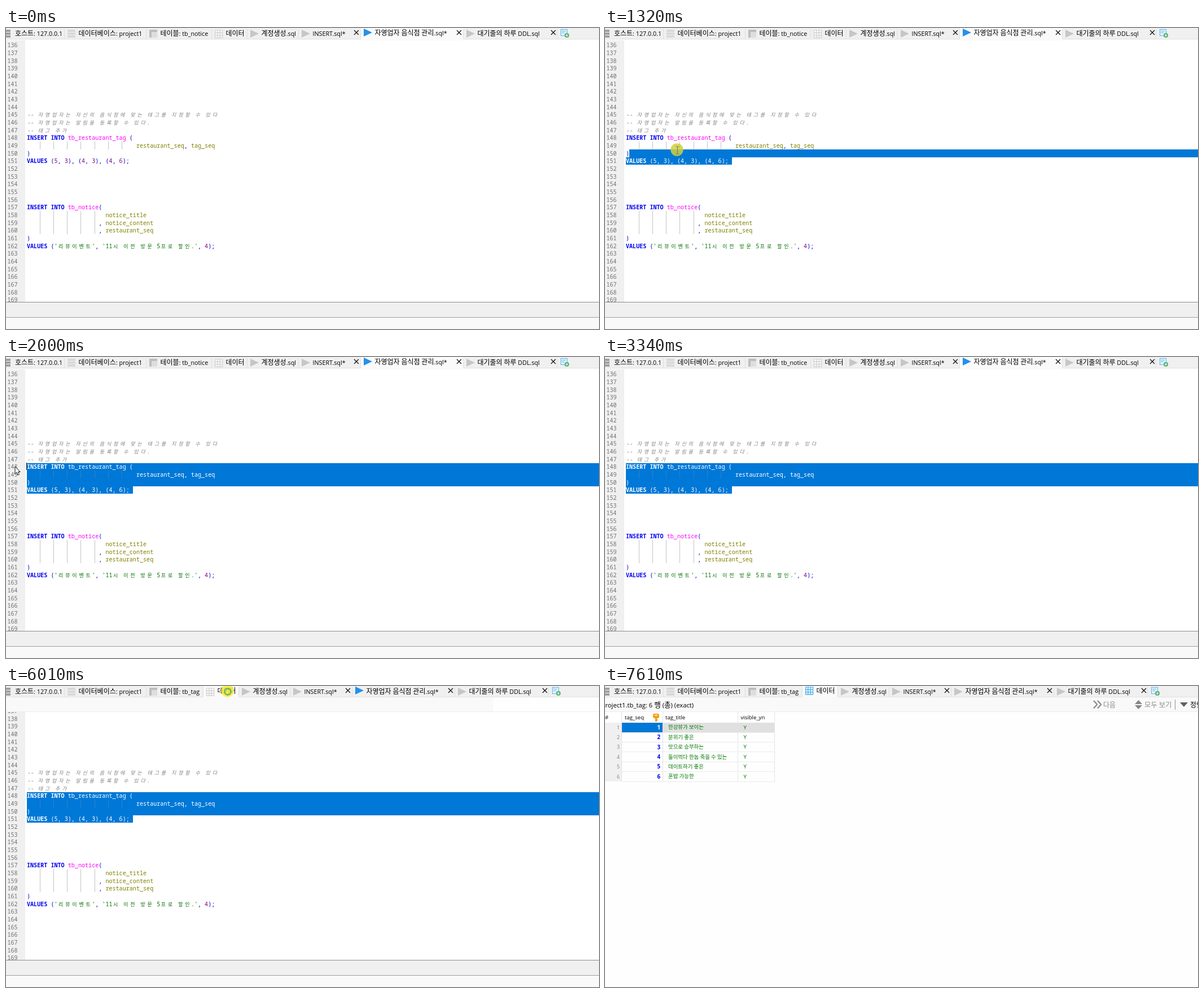
Recreate the animation shown at these times as an HTML page with a canvas. Size 1051 by 533 pixels, loop 8 s.

```html
<!DOCTYPE html>
<html lang="ko">
<head>
<meta charset="utf-8">
<style>
html, body { margin: 0; width: 100%; height: 100%; overflow: hidden; background: #fff; }
canvas { display: block; }
</style>
</head>
<body>
<canvas id="stage" width="1051" height="533"></canvas>
<script>
const ctx = document.getElementById('stage').getContext('2d');
const LOOP = 8000, W = 1051, H = 533;
const CELL = 6.06, ROW = 13.667, LEFT = 37, FIRST_ROW = 136;
const BLUE = '#0078d7';
const UI = '"Open Sans", "Noto Sans", sans-serif';
const HANGUL = '"Noto Sans CJK KR", "Noto Sans CJK", sans-serif';
const MONO = '"Noto Sans Mono", monospace';

const code = {
  145: '-- 자영업자는 자신의 음식점에 맞는 태그를 지정할 수 있다',
  146: '-- 자영업자는 알림을 등록할 수 있다.',
  147: '-- 태그 추가',
  148: 'INSERT INTO tb_restaurant_tag (',
  149: ' '.repeat(32) + 'restaurant_seq, tag_seq',
  150: ')',
  151: 'VALUES (5, 3), (4, 3), (4, 6);',
  157: 'INSERT INTO tb_notice(',
  158: ' '.repeat(23) + 'notice_title',
  159: ' '.repeat(21) + ', notice_content',
  160: ' '.repeat(21) + ', restaurant_seq',
  161: ')',
  162: "VALUES ('리뷰이벤트', '11시 이전 방문 5프로 할인.', 4);"
};
const TOKENS = /(--.*)|('[^']*')|(INSERT INTO|VALUES)|(tb_\w+)|([a-z]\w*)|(\d+)|(.)/g;
const COLORS = ['#808080', '#007000', '#0000f0', '#ff00ff', '#808000', '#800080', '#0000d0'];

// Left edge, icon, label, close button; tabs from index 3 slide with the table name
const tabs = [
  [-5, 'bars', '호스트: 127.0.0.1'],
  [104, 'bars', '데이터베이스: project1'],
  [249, 'table', '테이블: '],
  [365, 'grid', '데이터'],
  [428, 'play', '계정생성.sql'],
  [519, 'play', 'INSERT.sql*', 621],
  [629, 'play', '자영업자 음식점 관리.sql*', 803],
  [811, 'play', '대기줄의 하루 DDL.sql', 970]
];
const tags = ['한강뷰가 보이는', '분위기 좋은', '맛으로 승부하는', '둘이먹다 한놈 죽을 수 있는', '데이트하기 좋은', '혼밥 가능한'];

// Pointer tracks: time, x, y. The pointer is hidden between tracks.
const tracks = [
  [[190, 391, 369], [560, 83, 270], [980, 223, 234], [1250, 223, 234], [1320, 128, 216],
   [1740, 16, 194], [2000, 16, 194], [2190, 150, 202]],
  [[3600, 193, 203], [3870, 44, 154]],
  [[5500, 60, 140], [5870, 393, 9], [7150, 393, 9], [7350, 919, 17], [7550, 919, 17],
   [7551, 803, 254], [7610, 803, 254]]
];

const within = (t, a, b) => t >= a && t < b;
const isHangul = c => c >= '가' && c <= '힣';
const rowTop = n => 23.8 + (n - FIRST_ROW) * ROW;

function rect(x, y, w, h, color) {
  ctx.fillStyle = color;
  ctx.fillRect(x, y, w, h);
}

function poly(color, ...p) {
  ctx.fillStyle = color;
  ctx.beginPath();
  for (let i = 0; i < p.length; i += 2) ctx.lineTo(p[i], p[i + 1]);
  ctx.closePath();
  ctx.fill();
}

function stroke(color, width, ...p) {
  ctx.strokeStyle = color;
  ctx.lineWidth = width;
  ctx.beginPath();
  for (let i = 0; i < p.length; i += 4) {
    ctx.moveTo(p[i], p[i + 1]);
    ctx.lineTo(p[i + 2], p[i + 3]);
  }
  ctx.stroke();
}

// Interface text: Latin runs are set slightly smaller than Hangul
function label(s, x, y, color = '#000', size = 12, style = '') {
  ctx.fillStyle = color;
  for (const run of s.match(/[가-힣]+|[^가-힣]+/g)) {
    ctx.font = isHangul(run[0]) ? `${style} ${size}px ${HANGUL}` : `${style} ${size * .895}px ${UI}`;
    ctx.fillText(run, x, y);
    x += ctx.measureText(run).width;
  }
}

function rightLabel(s, x, ...rest) {
  ctx.textAlign = 'right';
  label(s, x, ...rest);
  ctx.textAlign = 'left';
}

// Editor text on a fixed grid; Hangul takes two cells
function codeLine(s, y, selectedFrom) {
  let col = 0;
  for (const m of s.matchAll(TOKENS)) {
    const kind = m.slice(1).findIndex(Boolean);
    const style = kind === 0 ? 'italic ' : kind === 2 ? 'bold ' : '';
    for (const c of m[0]) {
      const wide = isHangul(c);
      ctx.font = style + (wide ? '9px ' + HANGUL : '10.1px ' + MONO);
      ctx.fillStyle = col >= selectedFrom ? '#fff' : COLORS[kind];
      ctx.fillText(c, LEFT + col * CELL + (wide ? 1.5 : 0), y);
      col += wide ? 2 : 1;
    }
  }
}

function pointer(t) {
  for (const keys of tracks) {
    for (let i = 1; i < keys.length; i++) {
      const [t0, x0, y0] = keys[i - 1], [t1, x1, y1] = keys[i];
      if (!within(t, t0, t1)) continue;
      const u = (t - t0) / (t1 - t0), k = u * u * (3 - 2 * u);
      return { x: x0 + (x1 - x0) * k, y: y0 + (y1 - y0) * k };
    }
  }
  return null;
}

// First selected row and column, following the drag
function selectionStart(t) {
  if (t < 1250) return null;
  const p = t < 1740 ? pointer(t) : { x: 16, y: 194 };
  const row = Math.min(151, FIRST_ROW + Math.floor((p.y - rowTop(FIRST_ROW)) / ROW));
  const col = Math.round((p.x - LEFT) / CELL);
  return { row, col: Math.max(0, Math.min(code[row].length, col)) };
}

function editor(t) {
  rect(0, 22, W, 463, '#fff');
  rect(0, 22, 34, 463, '#f0f0f0');
  const sel = selectionStart(t);
  ctx.save();
  ctx.beginPath();
  ctx.rect(0, 22, W, 463);
  ctx.clip();
  for (let n = FIRST_ROW; n < 170; n++) {
    const top = Math.round(rowTop(n)), height = Math.round(rowTop(n + 1)) - top;
    const base = rowTop(n) + 10.4;
    let from = Infinity;
    if (sel && n >= sel.row && n <= 151) {
      from = n === sel.row ? sel.col : 0;
      const x = LEFT + from * CELL;
      const end = n === 151 ? 225 : W;
      if (n < 151 || from < 30) rect(x, top, end - x, height, BLUE);
    }
    ctx.font = '10.1px ' + MONO;
    ctx.fillStyle = '#707070';
    ctx.fillText(n, 2.5, base);
    if (!code[n]) continue;
    const indent = code[n].search(/\S/);
    for (let c = 4; c < indent; c += 4)
      rect(Math.floor(LEFT + c * CELL) - 1, top, 1, height, c >= from ? '#2d83c6' : '#c4c4c4');
    codeLine(code[n], base, from);
  }
  const caretOn = within(t, 1740, 2340) || within(t, 2860, 3340) || within(t, 3870, 4400) || within(t, 4930, 5460);
  if (caretOn) rect(36, 187, 1, 13, '#202020');
  ctx.restore();
  rect(0, 485, W, 1, '#8c8c8c');
  rect(0, 486, W, 26, '#f0f0f0');
  rect(0, 512, W, 1, '#a0a0a0');
  rect(0, 513, W, 20, '#f9f9f9');
}

function icon(kind, x, lit) {
  const gray = '#c6c6c6';
  if (kind === 'play') {
    poly(lit ? '#2490ea' : gray, x, lit ? 1 : 3, x + 15, lit ? 8 : 10, x, lit ? 15 : 17);
  } else if (kind === 'bars') {
    for (let i = 0; i < 3; i++) rect(x, 3 + i * 5, 14, 4, x < 0 ? '#a0a0a0' : '#d9d9d9');
  } else if (kind === 'table') {
    rect(x, 3, 14, 14, '#dedede');
    rect(x, 3, 14, 4, '#bdbdbd');
    rect(x, 3, 4, 14, '#bdbdbd');
  } else {
    const top = lit ? 1.5 : 3.5, c = lit ? '#4aaeea' : '#cfcfcf';
    rect(x, top, 14, 14, lit ? '#e4f4fd' : '#fafafa');
    for (let i = 0; i < 4; i++) {
      const d = .5 + i * 4.4;
      stroke(c, 1.2, x + d, top, x + d, top + 14, x, top + d, x + 14, top + d);
    }
  }
}

function tabBar(t) {
  const moved = t >= 5130, active = t < 5940 ? 6 : 3;
  const shift = moved ? -15 : 0;
  rect(0, 0, W, 20, '#f0f0f0');
  rect(0, 19, W, 1, '#e2e2e2');
  tabs.forEach(([left, kind, text, close], i) => {
    const dx = i > 2 ? shift : 0, x = left + dx;
    const next = i < 7 ? tabs[i + 1][0] + (i > 1 ? shift : 0) : 977 + shift;
    const on = i === active;
    if (on) rect(x, 0, next - x, 20, '#fafafa');
    rect(next - 1, 2, 1, 17, '#e0e0e0');
    const lit = i === 6 ? t < 6080 : i === 3 && t >= 6080;
    icon(kind, x + (i ? 5 : -1), lit);
    if (i === 2) text += moved ? 'tb_tag' : 'tb_notice';
    label(text, i ? x + 24.5 : 16, on ? 12.5 : 14);
    if (close) {
      const cx = close + dx;
      stroke('#111', 1.3, cx - 4, 4, cx + 4, 12, cx + 4, 4, cx - 4, 12);
    }
  });
  const x = 983 + shift;
  rect(x, 2, 12, 12, '#58b4e8');
  rect(x + 1, 3, 10, 10, '#e6f5fd');
  stroke('#58b4e8', 1, x + 2, 5.5, x + 9, 5.5, x + 2, 8.5, x + 7, 8.5);
  ctx.fillStyle = '#4caf70';
  ctx.beginPath();
  ctx.arc(x + 11, 13, 4, 0, 7);
  ctx.fill();
  stroke('#fff', 1.2, x + 8.5, 13, x + 13.5, 13, x + 11, 10.5, x + 11, 15.5);
}

function dataView() {
  rect(0, 20, W, 513, '#fefefe');
  rect(0, 20, W, 26, '#f9f9f9');
  rect(0, 45, W, 1, '#ececec');
  label('project1.tb_tag: 6 행 (총) (exact)', -6.5, 37.5, '#000', 12.6);

  for (const x of [866, 873]) stroke('#858585', 2, x, 26, x + 6.5, 33, x + 6.5, 32.5, x, 39.5);
  label('다음', 883, 37.5, '#8c8c8c');
  poly('#858585', 939, 32, 945.5, 25, 952, 32);
  poly('#858585', 939, 34, 945.5, 41, 952, 34);
  label('모두 보기', 956, 37.5, '#8c8c8c', 12.4);
  rect(1010, 24, 1, 18, '#909090');
  poly('#606060', 1019, 29, 1033, 29, 1026, 37);
  label('정렬', 1037, 37.5);

  rect(0, 46, 300, 19, '#fff');
  label('#', 0, 59, '#222', 10.7);
  label('tag_seq', 35, 59, '#000', 10.7);
  label('tag_title', 107, 59, '#000', 10.7);
  label('visible_yn', 240.5, 59, '#000', 10.7);
  ctx.fillStyle = '#f0a010';
  ctx.beginPath();
  ctx.roundRect(85, 49, 11, 8, 3);
  ctx.fill();
  rect(89, 56, 3, 7, '#f0a010');
  rect(91, 59, 2.5, 2, '#f0a010');
  rect(88, 51, 5, 1.5, '#fff');

  rect(0, 65, 30, 104, '#f0f0f0');
  rect(102, 65, 198, 17, '#e0e0e0');
  tags.forEach((tag, i) => rect(30, Math.round(81.6 + i * 17.4), 271, 1, '#ebebeb'));
  for (const x of [29, 102, 235, 300]) rect(x, 46, 1, 123, '#e4e4e4');
  rect(30, 65, 72, 17, BLUE);
  ctx.setLineDash([1, 1]);
  ctx.strokeStyle = '#3c78b0';
  ctx.lineWidth = 1;
  ctx.strokeRect(30.5, 65.5, 71, 16);
  ctx.setLineDash([]);
  tags.forEach((tag, i) => {
    const base = 76.6 + i * 17.4;
    rightLabel(String(i + 1), 26, base, '#808080', 10);
    rightLabel(String(i + 1), 98, base + .2, i ? '#0000f0' : '#fff', 11, 'bold');
    label(tag, 112, base - .3, '#007800', 9.45);
    label('Y', 245.5, base, '#007800', 10.7);
  });
}

function drawPointer(t) {
  const p = pointer(t);
  if (!p) return;
  const { x, y } = p;
  if (within(t, 1050, 2000) || within(t, 5940, 6140)) {
    ctx.fillStyle = t < 2000 ? 'rgba(208,208,60,.85)' : t < 6080 ? 'rgba(250,240,40,.8)' : 'rgba(255,238,90,.75)';
    ctx.beginPath();
    ctx.arc(x - .5, y - .5, 11.2, 0, 7);
    ctx.fill();
  }
  if (within(t, 6010, 6080)) {
    ctx.strokeStyle = 'rgba(90,160,110,.75)';
    ctx.lineWidth = 3;
    ctx.beginPath();
    ctx.arc(x, y + 1, 5.5, 0, 7);
    ctx.stroke();
  } else if (x < 36 || y < 22 || t > 5000) {
    ctx.save();
    ctx.translate(x, y);
    const arrow = new Path2D('M0 0V13L3 10.3L5.2 15L7.4 14L5.3 9.5H9.3Z');
    ctx.fillStyle = '#fff';
    ctx.strokeStyle = '#111';
    ctx.lineWidth = 1;
    ctx.fill(arrow);
    ctx.stroke(arrow);
    ctx.restore();
  } else {
    stroke('#777', 1, x + .5, y - 6, x + .5, y + 7, x - 2.5, y - 6, x + 3.5, y - 6, x - 2.5, y + 7, x + 3.5, y + 7);
  }
}

function frame() {
  const t = performance.now() % LOOP;
  rect(0, 0, W, H, '#f9f9f9');
  if (t < 6080) editor(t);
  else dataView();
  if (within(t, 5940, 6080)) {
    rect(0, 20, W, 26, '#f9f9f9');
    rect(863, 20, W - 863, 26, '#fefefe');
    rect(0, 45, W, 1, '#ececec');
  }
  tabBar(t);
  drawPointer(t);
  requestAnimationFrame(frame);
}
frame();
</script>
</body>
</html>
```
